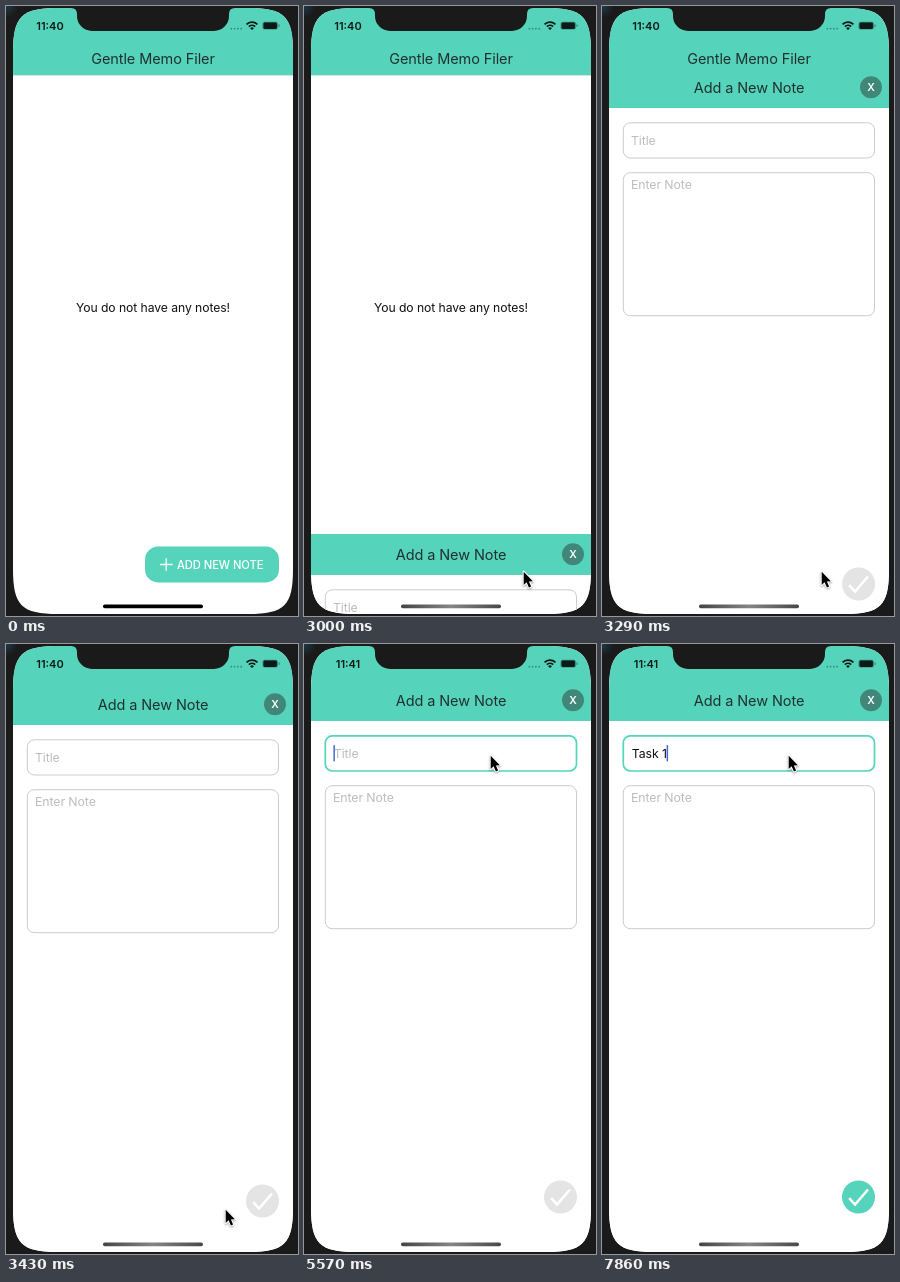
An HTML page with a canvas that plays this animation: 292 px wide and 610 px high, repeating every 8 s.

```html
<!DOCTYPE html>
<html lang="en">
<head>
<meta charset="utf-8">
<title>Note app</title>
<style>
html, body { margin: 0; width: 100%; height: 100%; overflow: hidden; background: #1a1a1a; }
canvas { display: block; width: 292px; height: 610px; }
</style>
</head>
<body>
<canvas id="stage"></canvas>
<script>
const W = 292, H = 610, LOOP = 8000, FPS = 7;
const TEAL = '#55d4bb', BEZEL = '#1a1a1a', INK = '#20302e';
const canvas = document.getElementById('stage');
const ctx = canvas.getContext('2d');
const dpr = window.devicePixelRatio || 1;
canvas.width = W * dpr;
canvas.height = H * dpr;

// Event times, in ticks of 1/7 s
const AT = { cursor: 16, modal: 21, focus: 31, caretOff: 34, clock: 37, caretOn: 38 };
const KEYS = [[41, 'T'], [43, 'a'], [47, 's'], [50, 'k'], [52, ' '], [55, '1']];
const PATH = [[16, 257, 567], [19, 219, 565], [24, 219, 565], [28, 190, 112], [30, 186, 111]];

function box(x, y, w, h, r, fill) {
  ctx.beginPath();
  ctx.roundRect(x, y, w, h, r);
  if (fill) { ctx.fillStyle = fill; ctx.fill(); }
}

function disc(x, y, r, fill) {
  ctx.beginPath();
  ctx.arc(x, y, r, 0, Math.PI * 2);
  ctx.fillStyle = fill;
  ctx.fill();
}

function line(points, color, width) {
  ctx.beginPath();
  points.forEach(([x, y]) => ctx.lineTo(x, y));
  ctx.strokeStyle = color;
  ctx.lineWidth = width;
  ctx.stroke();
}

function text(str, x, y, size, color, { align = 'left', weight = 400, track = -0.006 } = {}) {
  ctx.font = `${weight} ${size}px Inter, Roboto, sans-serif`;
  ctx.letterSpacing = `${size * track}px`;
  ctx.textAlign = align;
  ctx.fillStyle = color;
  ctx.fillText(str, x, y);
  return ctx.measureText(str).width;
}

function field(y, h, focused) {
  box(21.3, y, 251.2, h, 7);
  ctx.strokeStyle = focused ? TEAL : '#cbcbcb';
  ctx.lineWidth = focused ? 1.7 : 1;
  ctx.stroke();
}

// Screen outline with continuous-curvature corners
function screenPath() {
  const l = 7, t = 2, r = 287, b = 608, e = 45, c = 8.4;
  ctx.beginPath();
  ctx.moveTo(l, t + e);
  ctx.bezierCurveTo(l, t + c, l + c, t, l + e, t);
  ctx.lineTo(r - e, t);
  ctx.bezierCurveTo(r - c, t, r, t + c, r, t + e);
  ctx.lineTo(r, b - e);
  ctx.bezierCurveTo(r, b - c, r - c, b, r - e, b);
  ctx.lineTo(l + e, b);
  ctx.bezierCurveTo(l + c, b, l, b - c, l, b - e);
  ctx.closePath();
}

function drawHome() {
  ctx.fillStyle = '#fff';
  ctx.fillRect(0, 0, W, H);
  ctx.fillStyle = TEAL;
  ctx.fillRect(0, 0, W, 69);
  ctx.fillStyle = '#cfdedb';
  ctx.fillRect(0, 69, W, 0.8);
  text('Gentle Memo Filer', 147, 58, 14.5, INK, { align: 'center' });
  text('You do not have any notes!', 147, 306, 12.2, '#111', { align: 'center' });
  box(139, 540.6, 134, 35.8, 13, TEAL);
  line([[154, 558.5], [166.5, 558.5]], '#fff', 1.3);
  line([[160.2, 552.3], [160.2, 564.7]], '#fff', 1.3);
  text('ADD NEW NOTE', 171, 562.5, 11.2, '#fff', { weight: 500 });
}

function drawModal(tick) {
  const u = 14.55 * (tick / FPS - 2.9446);
  const offset = Math.round(H * (1 + u) * Math.exp(-u));
  const focused = tick >= AT.focus;
  const typed = KEYS.filter(k => tick >= k[0]).map(k => k[1]).join('');
  const blink = tick >= AT.caretOff && tick < AT.caretOn;

  ctx.save();
  ctx.translate(0, offset);
  ctx.fillStyle = '#fff';
  ctx.fillRect(0, 36, W, H);
  ctx.fillStyle = TEAL;
  ctx.fillRect(0, 36, W, 41);
  text('Add a New Note', 147, 61.8, 14.5, INK, { align: 'center' });
  disc(269, 56.3, 11, '#40877a');
  text('X', 269, 60, 10.5, '#fff', { align: 'center', weight: 600, track: 0 });

  field(91.8, 35.2, focused);
  field(141.7, 143, false);
  const x = focused ? 29.8 : 29;
  let width = 0;
  if (typed) width = text(typed, x, 114, 12.3, '#111');
  else text('Title', x, 114, 12.3, '#bdbdbd');
  text('Enter Note', 29, 158, 12.3, '#bdbdbd');
  if (focused && !blink) box(x - 0.4 + width, 101, 1.5, 16.5, 0.7, '#4468d4');

  disc(256.5, 553, 16.5, typed ? TEAL : '#e4e4e4');
  line([[247.2, 554.2], [253, 560.5], [266, 545.5]], '#fff', 2.5);
  ctx.restore();
}

function drawStatus(tick) {
  text(tick >= AT.clock ? '11:41' : '11:40', 44, 23.8, 11, '#0c1a17',
    { align: 'center', weight: 600, track: 0 });
  for (let i = 0; i < 4; i++) disc(225.3 + i * 3.3, 22.7, 0.9, 'rgba(20,70,60,.5)');
  ctx.strokeStyle = '#0c1a17';
  [4.3, 7.5].forEach(r => {
    ctx.beginPath();
    ctx.arc(246, 23.6, r, -Math.PI * 0.76, -Math.PI * 0.24);
    ctx.lineWidth = 1.8;
    ctx.stroke();
  });
  ctx.beginPath();
  ctx.moveTo(246, 24);
  ctx.arc(246, 24, 2.6, -Math.PI * 0.76, -Math.PI * 0.24);
  ctx.fillStyle = '#0c1a17';
  ctx.fill();
  box(256.5, 15.8, 15.4, 7.8, 2.2, 'rgba(12,26,23,.4)');
  box(257.5, 16.5, 13.4, 6.4, 1.4, '#0c1a17');
  box(272.5, 18.3, 1, 2.8, 0.5, 'rgba(12,26,23,.5)');
}

function drawHomeBar(modal) {
  let fill = '#000';
  if (modal) {
    fill = ctx.createLinearGradient(97, 0, 197, 0);
    fill.addColorStop(0, '#444');
    fill.addColorStop(0.5, '#858585');
    fill.addColorStop(1, '#484848');
  }
  box(97, 598.5, 100, 3.7, 1.8, fill);
}

function drawNotch() {
  ctx.beginPath();
  ctx.moveTo(65, 0);
  ctx.lineTo(65, 2);
  ctx.quadraticCurveTo(71, 2, 71, 8);
  ctx.arcTo(71, 25, 87, 25, 15);
  ctx.arcTo(223, 25, 223, 8, 15);
  ctx.lineTo(223, 8);
  ctx.quadraticCurveTo(223, 2, 229, 2);
  ctx.lineTo(229, 0);
  ctx.fillStyle = BEZEL;
  ctx.fill();
}

function drawCursor(tick) {
  let i = 0;
  while (i < PATH.length - 2 && tick >= PATH[i + 1][0]) i++;
  const [t0, x0, y0] = PATH[i], [t1, x1, y1] = PATH[i + 1];
  const p = Math.min(1, (tick - t0) / (t1 - t0));
  const e = p * p * (3 - 2 * p);
  ctx.save();
  ctx.translate(x0 + (x1 - x0) * e, y0 + (y1 - y0) * e);
  ctx.beginPath();
  [[0.7, 0.7], [0.7, 14], [3.6, 11.2], [5.9, 16.4], [8.1, 15.5], [5.9, 10.4], [9.9, 10.2]]
    .forEach(([x, y]) => ctx.lineTo(x, y));
  ctx.closePath();
  ctx.lineJoin = 'round';
  ctx.shadowColor = 'rgba(0,0,0,.35)';
  ctx.shadowBlur = 2 * dpr;
  ctx.shadowOffsetY = dpr;
  ctx.strokeStyle = '#fff';
  ctx.lineWidth = 2.2;
  ctx.stroke();
  ctx.shadowColor = 'transparent';
  ctx.fillStyle = '#000';
  ctx.fill();
  ctx.restore();
}

function draw(ms) {
  const tick = Math.floor((ms % LOOP + 5) / (1000 / FPS)) % (LOOP * FPS / 1000);
  const modal = tick >= AT.modal;
  ctx.setTransform(dpr, 0, 0, dpr, 0, 0);
  ctx.fillStyle = BEZEL;
  ctx.fillRect(0, 0, W, H);
  const tint = ctx.createRadialGradient(0, 0, 0, 0, 0, 12);
  tint.addColorStop(0, '#1f3a4a');
  tint.addColorStop(1, BEZEL);
  ctx.fillStyle = tint;
  ctx.fillRect(0, 0, 12, 12);

  ctx.save();
  screenPath();
  ctx.clip();
  drawHome();
  if (modal) drawModal(tick);
  drawStatus(tick);
  drawHomeBar(modal);
  ctx.restore();
  drawNotch();
  if (tick >= AT.cursor) drawCursor(tick);
}

const start = performance.now();
function loop() {
  draw(performance.now() - start);
  requestAnimationFrame(loop);
}
loop();
</script>
</body>
</html>
```
